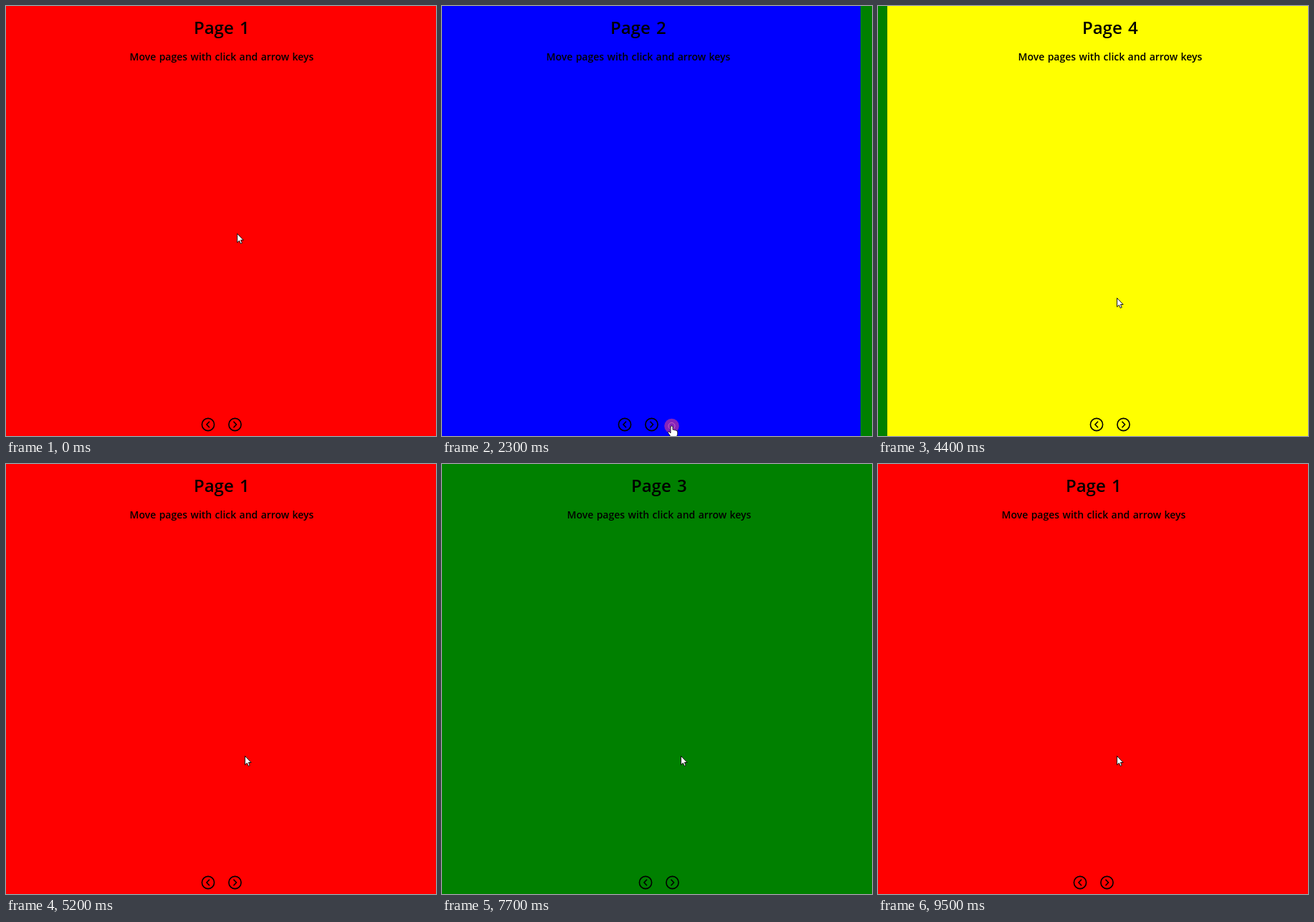
Animation, 600 px wide and 600 px high, one loop 9900 ms. Source, as an HTML page:

```html
<!DOCTYPE html>
<html lang="en">
<head>
<meta charset="utf-8">
<title>Page slider</title>
<style>
  html, body { margin: 0; width: 100%; height: 100%; overflow: hidden; background: red; }
  svg { display: block; width: 100%; height: 100%; }
  text { font-family: "Open Sans", "Noto Sans", sans-serif; font-weight: 600; text-anchor: middle; }
  .title { font-size: 24px; word-spacing: 2px; }
  .hint { font-size: 14px; word-spacing: .7px; }
  .button { fill: none; stroke: #000; stroke-width: 1.6; }
</style>
</head>
<body>
<svg viewBox="0 0 600 600">
  <g id="strip"></g>
  <g id="click">
    <circle r="10.3" fill="#dc3c8c" fill-opacity=".6"/>
    <circle r="4.5" fill="none" stroke="#f08cc8" stroke-opacity=".6"/>
  </g>
  <g id="cursor" stroke="#000" fill="#fff" stroke-linejoin="round">
    <path id="arrow" stroke-width=".9" d="M0 0V12.3L2.8 9.7L4.7 13.9L6.7 13L4.9 9H8.6Z"/>
    <path id="hand" stroke-width=".8" d="M-1.5 1Q0 -1 1.5 1V5.3Q3 4.6 4 5.9Q5.5 5.3 6.2 6.6Q8 6.2 8.2 8V11.5L6.8 15.5H-1L-5 9.6Q-5.6 7.6 -3.6 8L-1.5 10Z"/>
  </g>
</svg>
<script>
const LOOP = 9900, STEP = 100, PAGE_WIDTH = 621, CENTER = 300.5, SLIDE = 775;
const colors = ['#f00', '#00f', '#008000', '#ff0'];
// start time, page left, page entered
const slides = [
  [1110, 0, 1], [2185, 1, 2], [3225, 2, 3], [4338, 3, 0],
  [5570, 0, 3], [6624, 3, 2], [7668, 2, 1], [8665, 1, 0]
];
const clicks = [980, 2090, 3140], CLICK_TIME = 300;
const start = [322.7, 317.7], target = [320.5, 586], rest = [333.5, 407.5];
const $ = id => document.getElementById(id);
const clamp = v => Math.max(0, Math.min(1, v));
const show = (el, on) => el.setAttribute('visibility', on ? 'visible' : 'hidden');
const move = (el, x, y) => el.setAttribute('transform', `translate(${x} ${y})`);

// cubic-bezier(.42, 0, .58, 1), solved for its parameter by bisection
function easeInOut(x) {
  if (x <= 0 || x >= 1) return clamp(x);
  let low = 0, high = 1;
  for (let i = 0; i < 24; i++) {
    const s = (low + high) / 2, r = 1 - s;
    if (1.26 * r * r * s + 1.74 * r * s * s + s ** 3 < x) low = s; else high = s;
  }
  return low * low * (3 - 2 * low);
}

function button(x, dir) {
  return `<g class="button" transform="translate(${x} 584)"><circle r="8.6"/>
    <path d="M${-2 * dir} -4.2L${2 * dir} 0L${-2 * dir} 4.2"/></g>`;
}

$('strip').innerHTML = colors.map((color, i) => `
  <g transform="translate(${CENTER + i * PAGE_WIDTH} 0)">
    <rect x="${-PAGE_WIDTH / 2}" width="${PAGE_WIDTH}" height="600" fill="${color}"/>
    <text class="title" x=".3" y="39">Page ${i + 1}</text>
    <text class="hint" x=".5" y="76">Move pages with click and arrow keys</text>
    ${button(-18.5, -1)}${button(19, 1)}
  </g>`).join('');

function pageAt(t) {
  let page = 0;
  for (const [begin, from, to] of slides)
    if (t >= begin) page = from + (to - from) * easeInOut((t - begin) / SLIDE);
  return page;
}

function cursorAt(t) {
  if (t < 3300) {
    const k = easeInOut(t / 980), bend = [392, 450];
    return start.map((a, i) => (1 - k) ** 2 * a + 2 * k * (1 - k) * bend[i] + k * k * target[i]);
  }
  const k = easeInOut((t - 3400) / 550);
  return target.map((a, i) => a + (rest[i] - a) * k);
}

function draw(t) {
  move($('strip'), -Math.round(pageAt(t) * PAGE_WIDTH), 0);
  const [x, y] = cursorAt(t);
  const overButton = Math.hypot(x - 319.5, y - 584) < 10;
  move($('cursor'), x, y);
  show($('arrow'), !overButton);
  show($('hand'), overButton);
  move($('click'), x, y);
  show($('click'), clicks.some(c => t >= c && t < c + CLICK_TIME));
}

const origin = performance.now();
function tick() {
  const t = (performance.now() - origin) % LOOP;
  draw(Math.floor(t / STEP) * STEP);
  requestAnimationFrame(tick);
}
tick();
</script>
</body>
</html>
```
